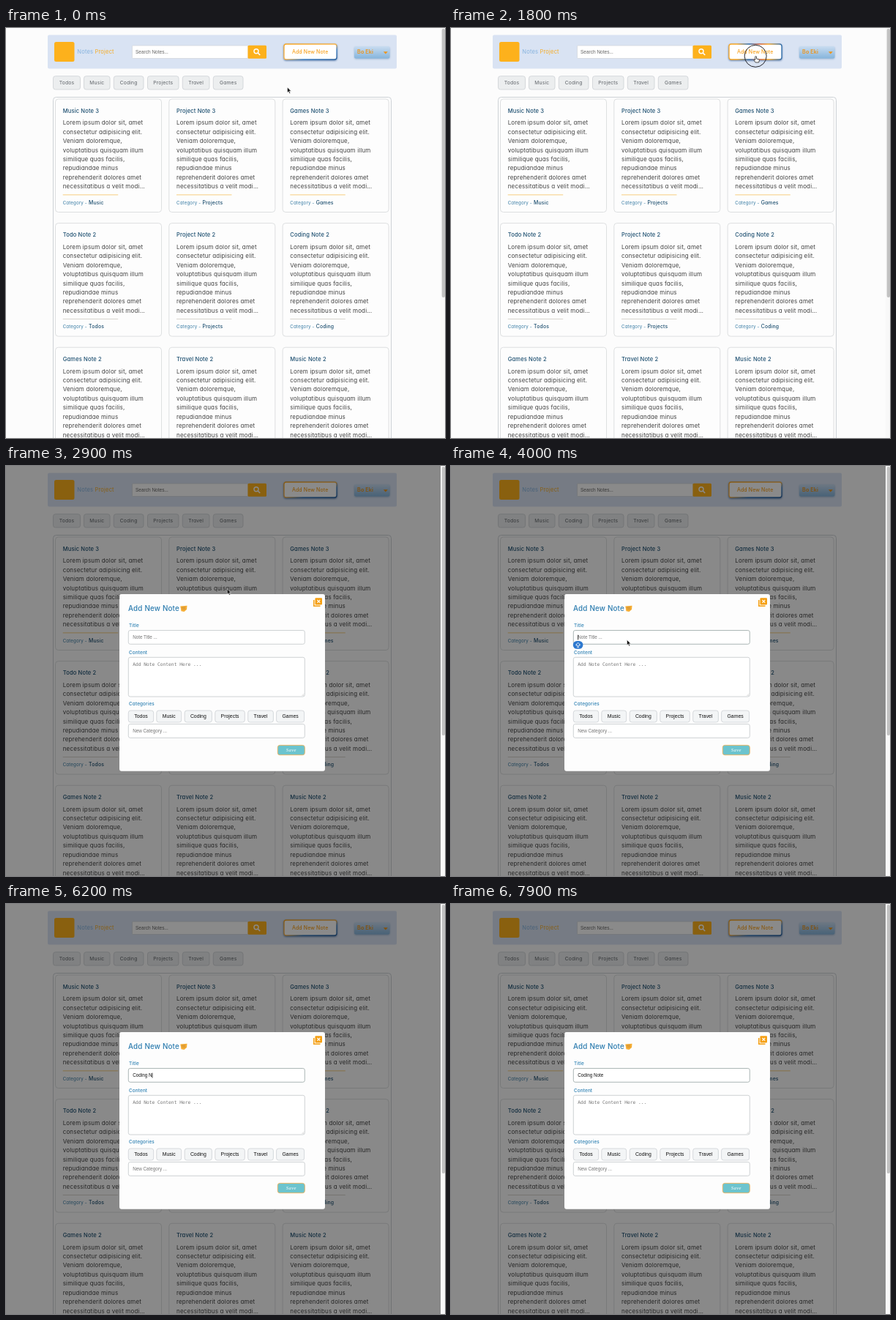
Animation of 600 by 560 pixels, one loop 8 s. Source, as an HTML page:

```html
<!DOCTYPE html>
<html lang="en">
<head>
<meta charset="utf-8">
<title>Notes</title>
<style>
  html, body { margin: 0; width: 100%; height: 100%; overflow: hidden; background: #fcfcfc; }
  svg { display: block; width: 600px; height: 560px; }
  text { font-family: Inter, "Open Sans", sans-serif; font-feature-settings: "cv11"; letter-spacing: .02em; white-space: pre; }
  .ui { font-family: "Liberation Sans", Arial, sans-serif; letter-spacing: 0; }
  .mono { font-family: "DejaVu Sans Mono", monospace; letter-spacing: 0; }
  .serif { font-family: "Liberation Serif", serif; font-style: italic; letter-spacing: .04em; }
  .medium { font-weight: 500; }
  .bold { font-weight: 600; }
  .mid { text-anchor: middle; }
  #addBorder { filter: drop-shadow(.5px 1px .8px #5c7dab); }
  #user { filter: drop-shadow(0 1px 1px #9eb6d3); }
</style>
</head>
<body>
<svg id="stage" viewBox="0 0 600 560" xmlns="http://www.w3.org/2000/svg">
  <defs>
    <linearGradient id="rest" x1="0" y1="0" x2="1" y2="1">
      <stop offset="0" stop-color="#f9a825"/><stop offset=".5" stop-color="#f9b44a"/>
      <stop offset=".68" stop-color="#3f7fc0"/><stop offset="1" stop-color="#2d64a0"/>
    </linearGradient>
    <linearGradient id="hover">
      <stop offset="0" stop-color="#f9a825"/><stop offset=".15" stop-color="#f9a825"/>
      <stop offset=".38" stop-color="#2f6fae"/><stop offset=".58" stop-color="#d9623a"/>
      <stop offset=".75" stop-color="#f9a825"/><stop offset="1" stop-color="#2f6fae"/>
    </linearGradient>
    <linearGradient id="leave">
      <stop offset="0" stop-color="#f9a825"/><stop offset=".12" stop-color="#3f7fc0"/>
      <stop offset="1" stop-color="#2d64a0"/>
    </linearGradient>
    <linearGradient id="pill" x2="0" y2="1">
      <stop offset="0" stop-color="#c9dcf0"/><stop offset="1" stop-color="#86b5dc"/>
    </linearGradient>
  </defs>
  <g id="page"></g>
  <g id="dialog"></g>
  <g id="pointer">
    <path id="arrow" d="M0 0V7.2L1.7 5.7L2.9 8.4L4.1 7.9L2.9 5.2H5.2Z" fill="#111" stroke="#fff" stroke-width=".5"/>
    <path id="hand" d="M-1 0Q0-.9 .8 0V3L3.8 3.7Q4.8 4 4.6 5.2L4 8H-.6L-2.9 4.7Q-2.8 3.6-1 4.6Z" fill="#fff" stroke="#222" stroke-width=".8" stroke-linejoin="round"/>
  </g>
  <circle id="ring" r="15" fill="none" stroke="#26262c" stroke-width="1"/>
</svg>
<script>
const LOOP = 8000;
const OPEN = 1900, FOCUS = 3600, CAPS_OFF = 4850;
const PHRASE = "Coding Note";
const KEYS = [4550, 5000, 5150, 5300, 5450, 5600, 5800, 6150, 6500, 6750, 7000];
const CATEGORIES = ["Todos", "Music", "Coding", "Projects", "Travel", "Games"];
const BODY = ["Lorem ipsum dolor sit, amet", "consectetur adipisicing elit.", "Veniam doloremque,",
  "voluptatibus quisquam illum", "similique quas facilis,", "repudiandae minus",
  "reprehenderit dolores amet", "necessitatibus a velit modi…"];
const CARDS = [["Music Note 3", "Music"], ["Project Note 3", "Projects"], ["Games Note 3", "Games"],
  ["Todo Note 2", "Todos"], ["Project Note 2", "Projects"], ["Coding Note 2", "Coding"],
  ["Games Note 2", "Games"], ["Travel Note 2", "Travel"], ["Music Note 2", "Music"]];

const $ = id => document.getElementById(id);
const text = (x, y, size, fill, str, cls = "", id = "") =>
  `<text x="${x}" y="${y}" font-size="${size}" fill="${fill}" class="${cls}" id="${id}">${str}</text>`;
const rect = (x, y, right, bottom, r, fill, stroke = "none", extra = "") =>
  `<rect x="${x}" y="${y}" width="${right - x}" height="${bottom - y}" rx="${r}" fill="${fill}" stroke="${stroke}" ${extra}/>`;

function chips(edges, top, bottom, size, fill, stroke, color, cls) {
  return CATEGORIES.map((name, i) => {
    const [left, right] = edges[i];
    return rect(left, top, right, bottom, 3, fill, stroke, 'stroke-width=".8"') +
      text((left + right) / 2, (top + bottom) / 2 + 2.4, size, color, name, cls + " mid");
  }).join("");
}

function card([title, category], i) {
  const x = 67.5 + (i % 3) * 155.3, row = Math.floor(i / 3), y = 97 + row * 169.6;
  const left = x + 10.2;
  return rect(x, y, x + 145, y + 154.5, 4, "#fdfdfd", "#d6d8da", 'stroke-width=".8"') +
    text(left, y + 18.6, 7.55, "#1d4f70", title, "medium") +
    BODY.map((line, n) => text(left, y + 35.3 + n * 12.43, 8, "#424242", line)).join("") +
    rect(left, y + 130.5, left + 75.5, y + 131.3, 0, row ? "#cfcbc3" : "#f5c261") +
    text(left, y + 143.5, 6.2, "#3b7ea6", "Category -") +
    text(left + 35.4, y + 143.5, 6.9, "#1d4f70", category, "medium");
}

$("page").innerHTML =
  rect(0, 0, 600, 560, 0, "#fcfcfc") +
  rect(57, 9.5, 534, 55.5, 2, "#d9e3f3") +
  rect(66, 19, 93.5, 46, 2.5, "#fdb11c") +
  text(97.3, 35.4, 7.6, "#86b3de", 'Notes <tspan fill="#f5ae2b">Project</tspan>') +
  rect(172.5, 24, 331, 41.5, 1, "#fff", "#d0d4da", 'stroke-width=".7"') +
  text(177, 35, 6.5, "#666", "Search Notes...", "ui") +
  rect(330.5, 23.7, 356, 41.7, 1.5, "#fdb11c") +
  '<circle cx="342" cy="31.7" r="3" fill="none" stroke="#fff" stroke-width="1.4"/>' +
  '<path d="M344.2 34L347.2 37" stroke="#fff" stroke-width="1.7"/>' +
  rect(380, 22, 452, 43, 3, "#fff", "url(#rest)", 'id="addBorder" stroke-width="1.3"') +
  text(415.7, 34.5, 6.95, "#f8a11d", "Add New Note", "medium mid") +
  rect(476, 25, 524.5, 41.5, 2.5, "url(#pill)", "none", 'id="user"') +
  text(480, 35.4, 7.2, "#ee9418", "Bo Eki", "bold") +
  '<path d="M515.8 32.2H521.8L518.8 35.4Z" fill="#ee9418"/>' +
  chips([[64.5, 101.5], [106.5, 142], [147.3, 188], [193.5, 236], [241.3, 278], [283.3, 324]],
    65.7, 84, 6.8, "#eceeef", "#cdd1d5", "#60656a", "") +
  rect(64.5, 94.5, 526.5, 580, 4, "none", "#c9cdd2", 'stroke-width=".9"') +
  CARDS.map(card).join("") +
  rect(594, 0, 600, 560, 0, "#f8f8f8") +
  rect(595.7, 1, 600, 368, 2, "#c2c2c2");

const field = (top, bottom, id = "") =>
  rect(167.3, top, 408.3, bottom, 2.5, "#fff", "#c9cdd0", `stroke-width=".9" id="${id}"`);

$("dialog").innerHTML =
  rect(0, 0, 594, 560, 0, "#000", "none", 'opacity=".46"') +
  rect(155, 175, 436, 416.7, 3, "#fdfdfd") +
  text(167, 197.8, 9.8, "#2c7caf", "Add New Note", "medium") +
  '<path d="M238.3 191.5L247.5 190.8L247 196L243.5 199L239.5 198.2Z" fill="#f5ad35"/>' +
  '<path d="M240 193.2H245M240.5 195.2H245" stroke="#b98338" stroke-width=".7"/>' +
  '<path d="M420.8 183V191.3H429.5" fill="none" stroke="#f59f12" stroke-width="1.5"/>' +
  rect(422.5, 180.2, 432, 189.5, 1, "#f59f12") +
  '<path d="M425.4 183L429.2 186.8M429.2 183L425.4 186.8" stroke="#fff" stroke-width="1.2"/>' +
  [["Title", 220], ["Content", 256.6], ["Categories", 326.7]]
    .map(([label, y]) => text(168, y, 6.4, "#2d80b3", label, "medium")).join("") +
  field(224.5, 243.3, "titleBox") +
  text(173.2, 236.4, 6.3, "#757575", "Note Title ...", "ui", "hint") +
  text(173.2, 236.4, 6.3, "#111", "", "ui", "typed") +
  rect(0, 230.7, .8, 237.5, 0, "#111", "none", 'id="caret"') +
  field(261.3, 315) +
  text(173.2, 273.1, 6.25, "#757575", "Add Note Content Here ...", "mono") +
  '<path d="M404.5 314L407.3 311.2M406.3 314L407.3 313" stroke="#aaa" stroke-width=".5"/>' +
  chips([[167.3, 201.7], [205.8, 239.7], [244.2, 281.4], [285.8, 326.3], [330.7, 365.4], [369.6, 407.6]],
    334, 350, 6.9, "#f3f5f6", "#cdd1d5", "#111", "ui") +
  field(352.5, 371.3) +
  text(173.2, 364.2, 6.3, "#757575", "New Category ...", "ui") +
  rect(371.3, 381.4, 408.3, 394.7, 3, "#6cc4ce", "#e6b567", 'stroke-width="1"') +
  text(389.8, 390.2, 6.8, "#fff", "Save", "serif mid") +
  '<g id="badge">' + rect(166.8, 239, 180.4, 249.8, 5.2, "#2d78cf") +
  '<path d="M173.6 241.2L176.6 244.4H175V246H172.2V244.4H170.6ZM172.2 247.6H175" fill="none" stroke="#fff" stroke-width=".8"/></g>';

const show = (id, on) => $(id).setAttribute("visibility", on ? "inherit" : "hidden");
const smooth = p => p * p * (3 - 2 * p);

// Pointer stops: time, x, y
const PATH = [[0, 384.5, 81], [150, 384.5, 81], [800, 415, 36], [1100, 415, 36],
  [1500, 416.7, 39], [2300, 416.7, 39], [3300, 240.5, 237.5], [LOOP, 240.5, 237.5]];

function pointerAt(t) {
  const i = PATH.findIndex(stop => stop[0] > t);
  const [t0, x0, y0] = PATH[i - 1], [t1, x1, y1] = PATH[i];
  const p = smooth((t - t0) / (t1 - t0));
  return [x0 + (x1 - x0) * p, y0 + (y1 - y0) * p];
}

function draw(t) {
  const open = t >= OPEN, focused = t >= FOCUS;
  const [x, y] = pointerAt(t);
  const over = !open && y < 44;
  const leaving = open && t < OPEN + 200;
  const clicking = (t >= 1750 && t < OPEN) || (t >= 3500 && t < 3700);

  $("addBorder").setAttribute("stroke", `url(#${over ? "hover" : leaving ? "leave" : "rest"})`);
  show("dialog", open);
  show("pointer", t < KEYS[0]);
  show("arrow", !over);
  show("hand", over);
  show("ring", clicking);
  $("pointer").setAttribute("transform", `translate(${x} ${y})`);
  $("ring").setAttribute("cx", x - .5);
  $("ring").setAttribute("cy", y - .7);

  const count = KEYS.filter(key => key <= t).length;
  const lastEvent = count ? KEYS[count - 1] : FOCUS;
  $("typed").textContent = PHRASE.slice(0, count);
  show("hint", !count);
  show("caret", focused && (t - lastEvent) % 1000 < 500);
  $("caret").setAttribute("x", 173.3 + (count ? $("typed").getComputedTextLength() : 0));
  show("badge", focused && t < CAPS_OFF);
  $("titleBox").setAttribute("stroke", focused ? "#a3afae" : "#c9cdd0");
}

const start = performance.now();
function tick() {
  draw((performance.now() - start) % LOOP);
  requestAnimationFrame(tick);
}
tick();
</script>
</body>
</html>
```
